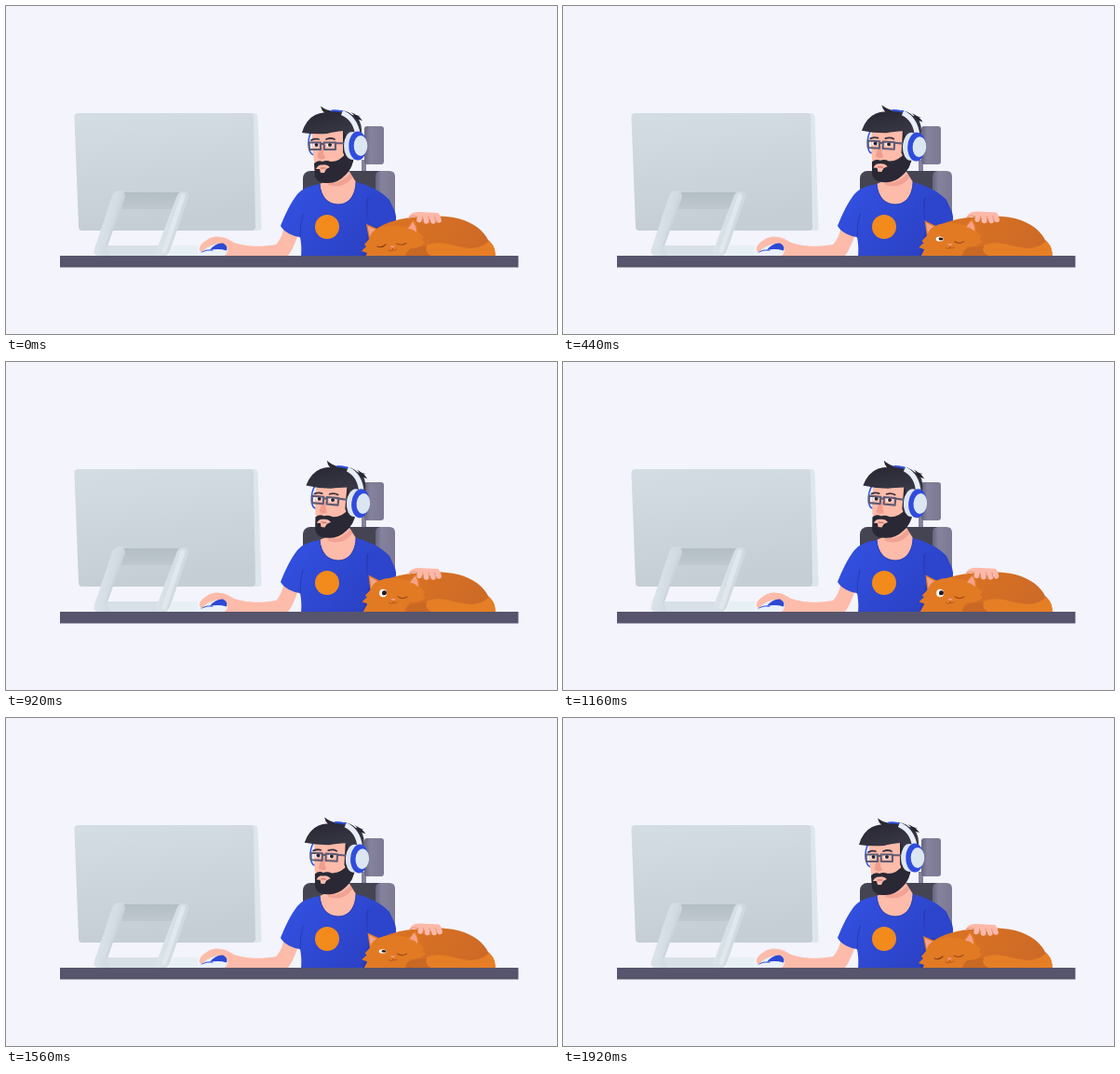
An HTML page for the animation above (1.96 s loop, 592 by 352 pixels).

```html
<!DOCTYPE html>
<html lang="en">
<head>
<meta charset="utf-8">
<title>Desk with cat</title>
<style>
html, body { margin: 0; width: 100%; height: 100%; overflow: hidden; background: #f3f4fc; }
svg { display: block; width: 100vw; height: 100vh; }
</style>
</head>
<body>
<svg viewBox="0 0 592 352" fill="none" stroke-linecap="round" stroke-linejoin="round">
  <defs>
    <linearGradient id="screen" x2="0.2" y2="1"><stop stop-color="#d3dde3"/><stop offset="1" stop-color="#c5ced5"/></linearGradient>
    <linearGradient id="leg" x2="1" y2="0.4"><stop stop-color="#e3ebf0"/><stop offset="1" stop-color="#cbd5dc"/></linearGradient>
    <linearGradient id="bar" x2="0" y2="1"><stop stop-color="#b3bdc4"/><stop offset="1" stop-color="#bfc8cf"/></linearGradient>
    <linearGradient id="shirt" x2="1" y2="0.6"><stop stop-color="#3352e4"/><stop offset="1" stop-color="#2b41c4"/></linearGradient>
    <linearGradient id="hair" x2="0.5" y2="1"><stop stop-color="#23222d"/><stop offset="1" stop-color="#3a3947"/></linearGradient>
    <linearGradient id="back" x2="1" y2="0.3"><stop stop-color="#dc7422"/><stop offset="1" stop-color="#cd6a26"/></linearGradient>
    <linearGradient id="rest" x2="1"><stop stop-color="#67647d"/><stop offset=".3" stop-color="#85829d"/><stop offset="1" stop-color="#7d7994"/></linearGradient>
    <clipPath id="above"><path d="M0 0H592V268.5H0z"/></clipPath>
  </defs>

  <!-- chair -->
  <path d="M382 165h5v16h-5z" fill="#85829d"/>
  <rect x="385" y="129" width="21" height="41" rx="3" fill="url(#rest)"/>
  <rect x="319" y="177" width="90" height="92" rx="8" fill="#454453"/>
  <path d="M397 183q0-6 6-6h9q6 0 6 6v86h-21z" fill="url(#rest)"/>

  <!-- mousing arm -->
  <path d="M299 236C297 246 294 252 290 256C272 259 258 258 245 254C236 247 226 246 219 249C212 253 207 257 208 262L213 264L221 259L228 267C236 269 244 268 256 268H303C307 263 311 254 314 245Z" fill="#fdbbaa"/>
  <path d="M213 258Q217 254 222 253" stroke="#ec9b8c"/>

  <!-- mouse -->
  <path d="M207 268Q206 263 213 261Q223 254 232 255Q238 258 238 263Q237 268 233 268Z" fill="#e9f0f8"/>
  <path d="M219 262Q225 254 233 254.500Q238.500 257 237 262.500Q228 260 219 262Z" fill="#2b49d4"/>
  <path d="M210 264Q216 261 222 262" stroke="#3454dc"/>
  <path d="M210.500 261Q216 254 222 254" stroke="#fdbbaa" stroke-width="5"/>

  <!-- torso -->
  <path d="M337 191C326 193 318 196 313 202C306 211 300 223 295 236C299 243 308 247 316 248Q318 258 317 269H392L418 243Q421 226 412 208C403 199 392 193 376 189Z" fill="url(#shirt)"/>
  <path d="M388 205Q385 221 391 236L387 252L383 269H400L418 243Q422 225 412 211Q402 219 388 205Z" fill="#283bb4"/>
  <path d="M390 204C400 200 413 209 418 221Q421 231 416 238L391 236Q386 222 390 204Z" fill="#2d45cd"/>
  <path d="M316 248Q316 234 319 223" stroke="#273bb5"/>
  <path d="M337 191C338 205 346 213 357 213C369 213 376 202 376 189L366 173H346V187Z" fill="#fdbbaa"/>
  <path d="M346 188Q357 193 370 180L372 184Q363 197 346 192Z" fill="#f0a294"/>
  <path d="M337 191C338 205 346 213 357 213C369 213 376 202 376 189" stroke="#263aae"/>
  <circle cx="345" cy="237" r="13" fill="#f28a1c"/>

  <g id="head">
    <ellipse cx="330" cy="147" rx="5" ry="12.5" fill="#e9eefb" stroke="#3152e0" stroke-width="1.5"/>
    <path d="M329 133H367V174L344 182L333 176Q328 156 329 133Z" fill="#fdbbaa"/>
    <path d="M338 152Q334 160 335 163Q339 166 343 163Q340 158 341 152Z" fill="#f09d8d"/>
    <path d="M362 132H375L376 160L366 166L362 157Z" fill="#2b2a36"/>
    <path d="M331 169Q335 165 340 167Q344 165 349 167Q359 167 366 157L374 160Q373 174 365 181Q357 190 346 190Q335 191 332 183Z" fill="#292834"/>
    <path d="M333 175Q335 170 340 170.500Q345 169.500 348 173L344 175L342 179H338L337 175Z" fill="#fdbbaa"/>
    <path d="M338 174h5" stroke="#c75c5c"/>
    <path d="M318 136Q322 122 332 117Q338 114 342 114.500Q339 112 338 107.500Q344 112 352 113Q364 110 372 117L381 118L377 119Q383 126 382 139L367 143L363 134Q352 135 345 137Q331 138 318 136Z" fill="url(#hair)"/>
    <path d="M370 114Q374 116 376 121L383 123Q379 117 370 114Z" fill="#25242f"/>
    <path d="M328 144Q332 142 336 143M344 143Q349 141 353 143" stroke="#393342" stroke-width="1.8"/>
    <g fill="#fff"><ellipse cx="333" cy="149" rx="3" ry="2.2"/><ellipse cx="347.5" cy="149" rx="3" ry="2.2"/></g>
    <g fill="#29232f"><circle cx="333.5" cy="149" r="2"/><circle cx="348" cy="149" r="2"/></g>
    <path d="M325.5 146.5H338V154H326ZM341.5 146.5H354V154H342ZM338 148H341.5M354 147L365 147.5" stroke="#5e5b75" stroke-width="2.1"/>
    <path d="M350 112.500Q367 111 376 126" stroke="#3152e0" stroke-width="2"/>
    <path d="M361 114.500Q375 120 378 138" stroke="#e9eef8" stroke-width="5.500" stroke-linecap="butt"/>
    <ellipse cx="372" cy="150" rx="9" ry="15" fill="#dce5f0"/>
    <ellipse cx="378" cy="150" rx="9.700" ry="15.500" fill="#2f4cdd"/>
    <ellipse cx="381" cy="150" rx="7.300" ry="11" fill="#dbe6f1"/>
  </g>

  <!-- monitor -->
  <path d="M260 115H267Q270 115 270.500 119L274.500 238Q274.500 241 271 241H260Z" fill="#dde6ed"/>
  <path d="M78 115H262Q266 115 266 119L268 237Q268 241 264 241H82Q78 241 78 237L73.500 120Q73 115 78 115Z" fill="url(#screen)"/>
  <path d="M122 200H190L184 218H121Z" fill="url(#bar)"/>
  <path d="M100 257H170V268.500H100Z" fill="#d7e0e6"/>
  <path d="M122 204L101 262" stroke="#ccd5db" stroke-width="12"/>
  <path d="M114 204Q116 198 122 198H127L107 257L112 268H99Q93 267 95 261Z" fill="url(#leg)"/>
  <path d="M184 203Q186 199 191 199Q198 199 196 206L176 263Q174 268.500 168 268.500Q160 268 162 261Z" fill="url(#leg)"/>
  <path d="M190 204L170 263" stroke="#e0e8ed" stroke-width="5"/>
  <path d="M179 257H206V268.500H175Z" fill="#e7f0f5"/>

  <!-- cat -->
  <g clip-path="url(#above)">
    <path d="M398 269V239C412 230 432 225 466 225.500C492 226 510 236 518 251Q527 259 525 269Z" fill="url(#back)"/>
    <path d="M519 252Q512 260 498 260Q486 259 474 255Q459 253 452 257L449 269H526Q526 258 519 252Z" fill="#e67e25"/>
    <path d="M429 269Q430 261 438 259L452 258Q449 264 458 269Z" fill="#c96823"/>
    <g id="cat">
      <path d="M382 263L387 258L385 256L390 250L387 234L399 239Q410 233 431 237L438 229Q443 236 443 243L449 248L447 251L450 254Q444 260 434 260Q428 266 427 276H383L388 265Z" fill="#e27a24"/>
      <path d="M388.500 236L397 240Q392 243 391 248ZM437 231.500L432 239Q437 239 441 243Q441 236 437 231.500Z" fill="#f5a28c"/>
      <path d="M420 255Q425 258 430 254.500" stroke="#9d4a1d" stroke-width="1.200"/>
      <path id="lid" d="M399 258Q404 260 408 256" stroke="#8d4019" stroke-width="1.200"/>
      <g id="eye">
        <ellipse rx="4" ry="4.200" fill="#fff"/>
        <circle cx="1.300" cy="-.3" r="2.500" fill="#241b22"/>
      </g>
      <path d="M412.500 257.500H418L415.500 260Z" fill="#f69c92"/>
      <path d="M415.500 260V262Q413 264 411 262M415.500 262Q418 263 420 261" stroke="#ad521f" stroke-width=".8"/>
    </g>
  </g>

  <!-- petting hand -->
  <g id="hand">
    <path d="M432 228Q434 221 443 221L464 222Q468 225 467 231L461 230L447 228L440 226Z" fill="#fdb9a8"/>
    <path d="M445 225L444 229.500M451 225L451.500 231M457.500 225L459 231M463 225L465 230" stroke="#fdb9a8" stroke-width="5.500"/>
    <path d="M447.500 226L448 232M454 226L455 233M460.500 226L462 232M433 227Q437 224 442 226" stroke="#e88f7c" stroke-width=".9"/>
  </g>

  <path d="M58 268H550.500V280.500H58Z" fill="#57546d"/>
</svg>
<script>
const LOOP = 1960;
const part = id => document.getElementById(id);
const [head, cat, eye, lid, hand] = ['head', 'cat', 'eye', 'lid', 'hand'].map(part);
const place = (el, value) => el.setAttribute('transform', value);

function ease(t, from, to) {
  const u = Math.min(1, Math.max(0, (t - from) / (to - from)));
  return u * u * (3 - 2 * u);
}

const start = performance.now();

function draw(now) {
  const t = Math.floor(Math.max(0, now - start) % LOOP / 40) * 40;
  const lift = ease(t, 120, 640) - ease(t, 1360, 1840);
  const open = Math.max(0, lift * 1.25 - 0.25);
  place(head, `rotate(${5 * lift} 360 184)`);
  place(cat, `translate(0 ${-2.5 * lift}) rotate(${4 * lift} 430 268)`);
  place(eye, `translate(404 ${254.3 - 2 * lift}) scale(1 ${open})`);
  lid.style.opacity = open > 0.1 ? 0 : 1;
  const stroke = (1 - Math.cos(t / LOOP * Math.PI * 4)) / 2;
  place(hand, `translate(${1.2 * stroke} ${-0.5 * stroke})`);
  requestAnimationFrame(draw);
}
requestAnimationFrame(draw);
</script>
</body>
</html>
```
